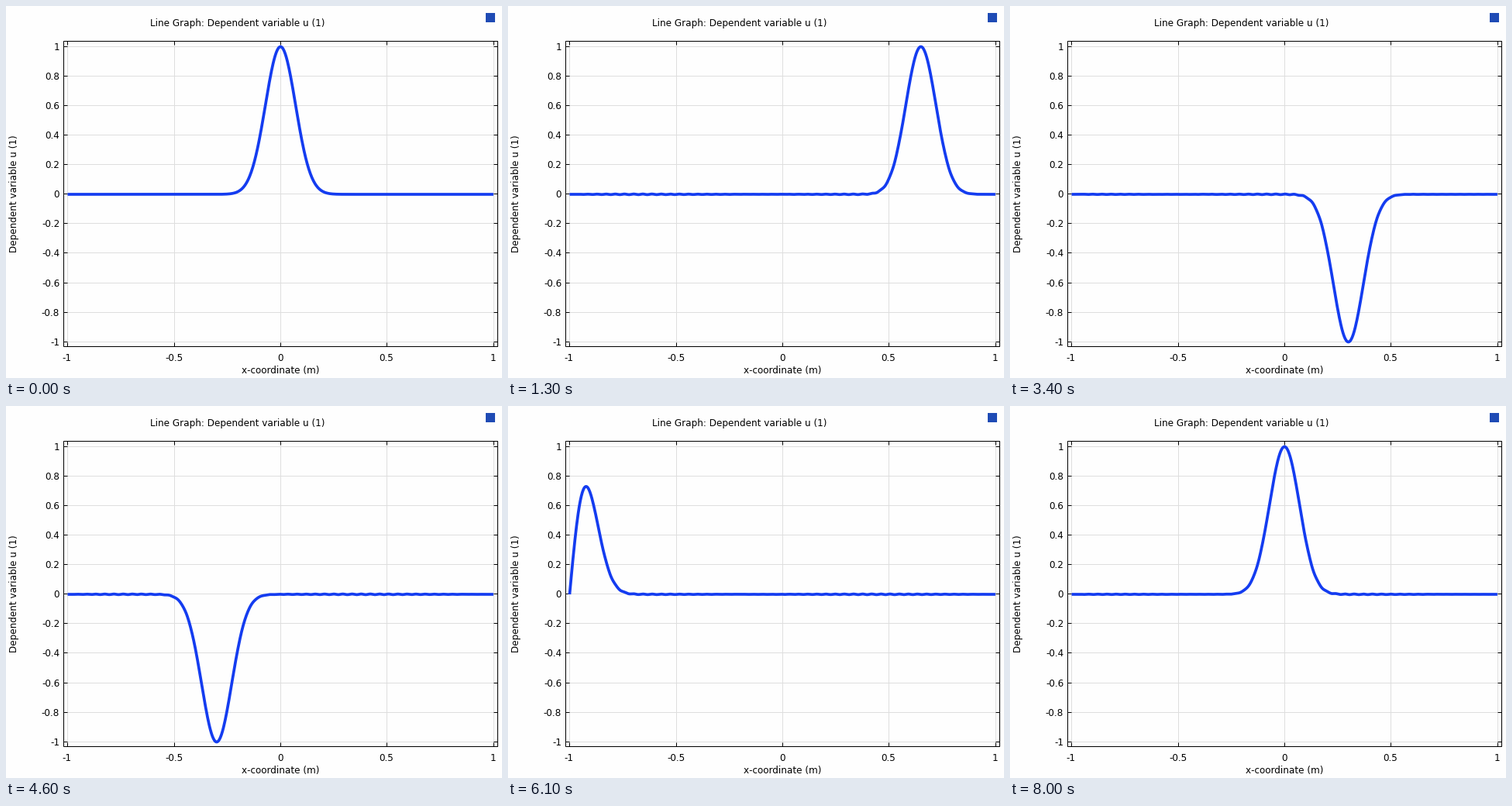
Write a matplotlib script that moves like this. It is 640x480 px and loops after 8.1 s.

```python
import numpy as np
import matplotlib.pyplot as plt
from matplotlib.animation import FuncAnimation
from matplotlib.patches import Rectangle

WIDTH, HEIGHT, DPI = 640, 480, 72
FRAMES, INTERVAL = 81, 100
SPEED = 0.05                      # distance per frame
LEFT, RIGHT, TOP, BOTTOM = 74.5, 634.5, 45.5, 439.5
BLUE, GRID, PAPER = "#143cf0", "#dedede", "#fefefe"

plt.rcParams["font.family"] = "DejaVu Sans"
plt.rcParams["font.size"] = 12


def px(x):
    return 354.2 + 274.7 * x


def py(u):
    return 243 - 190.5 * u


def pixel_center(p):
    return np.floor(p) + 0.5


fig = plt.figure(figsize=(WIDTH / DPI, HEIGHT / DPI), dpi=DPI, facecolor=PAPER)
ax = fig.add_axes([0, 0, 1, 1])
ax.set_xlim(0, WIDTH)
ax.set_ylim(HEIGHT, 0)
ax.axis("off")


def rule(x0, y0, x1, y1, color="black", z=2):
    ax.plot([x0, x1], [y0, y1], color=color, lw=1, zorder=z,
            solid_capstyle="butt", snap=False)


def label(x, y, text, **kw):
    ax.text(x, y, text, va="baseline", **kw)


def draw_axes():
    for x in np.linspace(-1, 1, 5):
        p = pixel_center(px(x) + 0.3)
        rule(p, TOP, p, BOTTOM, GRID, 1)
        rule(p, TOP, p, TOP + 5)
        rule(p, BOTTOM - 5, p, BOTTOM)
        label(p - 0.7, 458, f"{x:g}", ha="center")
    for u in np.linspace(-1, 1, 11).round(1) + 0.0:
        p = pixel_center(py(u) - 0.25)
        rule(LEFT, p, RIGHT, p, GRID, 1)
        rule(LEFT, p, LEFT + 5, p)
        rule(RIGHT - 5, p, RIGHT, p)
        label(69.2, p + 4.5, f"{u:g}", ha="right")
    ax.add_patch(Rectangle((LEFT, TOP), RIGHT - LEFT, BOTTOM - TOP,
                           fill=False, lw=1, zorder=3, snap=False))


draw_axes()
label(186, 26, "Line Graph: Dependent variable u (1)", ha="left")
label(354.5, 474, "x-coordinate (m)", ha="center")
label(14, 318.5, "Dependent variable u (1)", ha="left",
      rotation=90, rotation_mode="anchor")
ax.add_patch(Rectangle((619, 9), 12, 12, color="#1f4bb5", lw=0))

xs = np.linspace(-1, 1, 801)
curve, = ax.plot([], [], color=BLUE, lw=3.7, zorder=4,
                 solid_capstyle="butt", solid_joinstyle="round")


def pulse(d):
    return np.exp(-100 * d ** 2)


def wave(shift):
    """Travelling pulse, inverted at each fixed end."""
    return sum(pulse(xs - shift - 4 * k) - pulse(2 - xs - shift - 4 * k)
               for k in (-1, 0, 1))


def ripple(n):
    """Faint numerical noise that builds up on the flat parts."""
    strength = 0.0022 * min(1, n / 13)
    envelope = (1 - xs ** 8) * (0.6 + 0.4 * np.sin(5 * xs + 0.4 * n))
    return strength * envelope * np.sin(2 * np.pi * xs / 0.043 + 1.7 * n)


def update(n):
    u = wave(SPEED * n)
    curve.set_data(px(xs), py(u + ripple(n) * (1 - np.minimum(1, abs(u)))))
    return curve,


anim = FuncAnimation(fig, update, frames=FRAMES, interval=INTERVAL,
                     repeat=True, repeat_delay=0)
plt.show()
```
